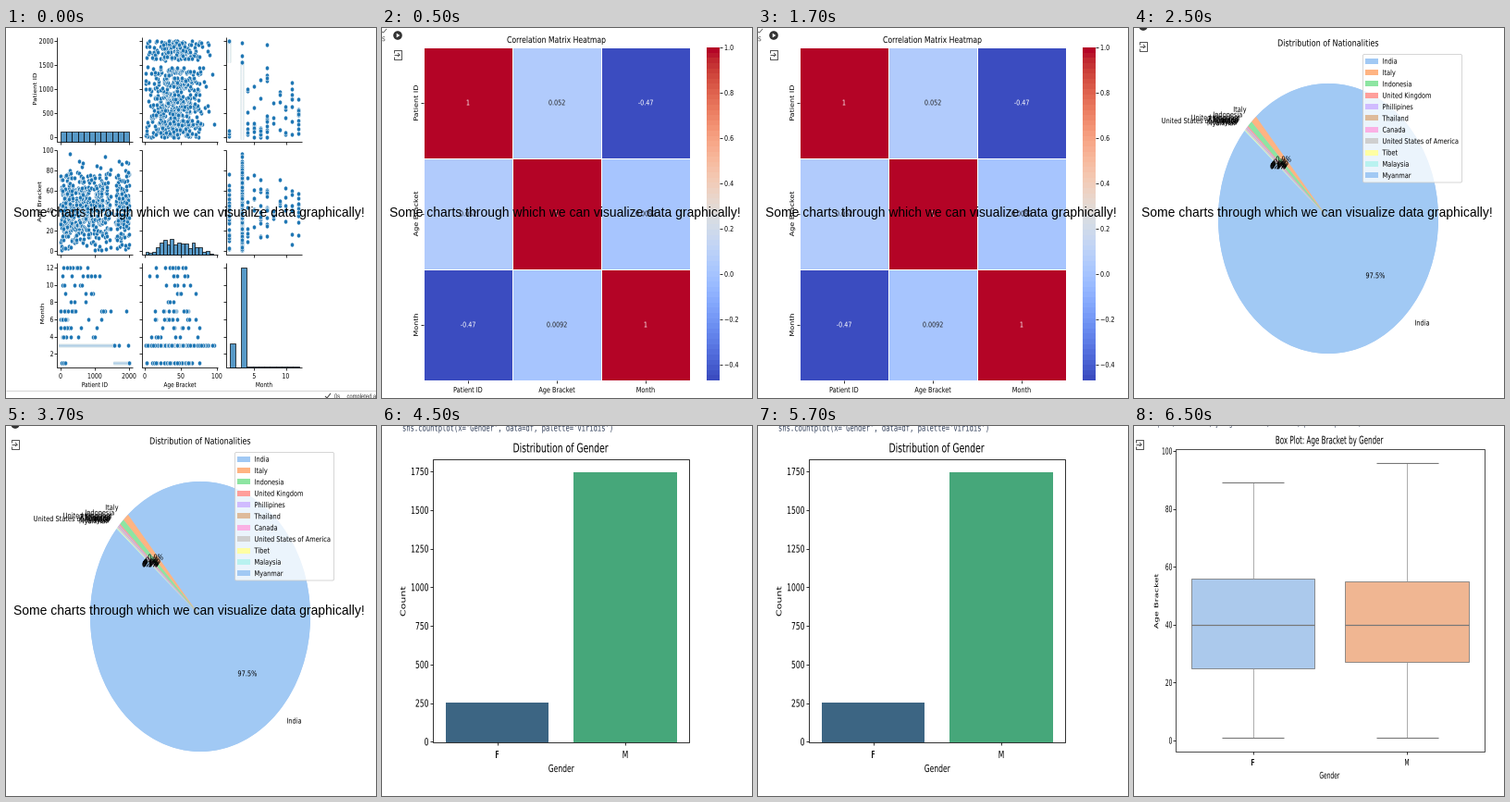
Write a matplotlib script that moves like this. It is 400 px wide and 400 px high and loops after 8000 ms.

```python
import numpy as np
import matplotlib.pyplot as plt
from matplotlib.animation import FuncAnimation
from matplotlib.markers import MarkerStyle
from matplotlib.patches import Circle, Ellipse, FancyBboxPatch, PathPatch, Polygon, Rectangle
from matplotlib.textpath import TextPath
from matplotlib.transforms import Affine2D

SIZE, DPI = 400, 100
PT = 72 / DPI  # points per pixel
CAP = 0.73  # capital height of DejaVu Sans in em
BLUE, BAR_BLUE, INK = "#1f77b4", "#5799c7", "#262626"
PASTEL = ["#a1c9f4", "#ffb482", "#8de5a1", "#ff9f9b", "#d0bbff", "#debb9b",
          "#fab0e4", "#cfcfcf", "#fffea3", "#b9f2f0", "#a1c9f4"]

fig = plt.figure(figsize=(SIZE / DPI, SIZE / DPI), dpi=DPI, facecolor="white")


def new_scene(stretch):
    """Full-figure axes in pixels, y down; stretch is the picture's height ratio."""
    ax = fig.add_axes([0, 0, 1, 1])
    ax.set(xlim=(0, SIZE), ylim=(SIZE, 0), autoscale_on=False)
    ax.axis("off")
    ax.stretch = stretch
    return ax


def text(ax, x, y, s, px, ha="center", rotation=0, color="black",
         family="DejaVu Sans", on_baseline=False, zorder=3):
    """Text with y at the middle of its capitals, or at its baseline."""
    path = TextPath((0, 0), str(s), size=px, prop={"family": family})
    box = path.get_extents()
    anchor = {"left": 0, "center": (box.x0 + box.x1) / 2, "right": box.x1}[ha]
    drop = 0 if on_baseline else CAP * px / 2
    place = (Affine2D().translate(-anchor, -drop).rotate_deg(rotation)
             .scale(1, -ax.stretch).translate(x, y))
    ax.add_patch(PathPatch(place.transform_path(path), fc=color, ec="none",
                           zorder=zorder))


def vtext(ax, x, y, s, px):
    text(ax, x, y, s, px, rotation=90)


def line(ax, xs, ys, color="black", px=0.8, **kw):
    ax.plot(xs, ys, color=color, lw=px * PT, solid_capstyle="butt", **kw)


def box(ax, x0, y0, x1, y1, fill="none", edge="none", px=0.8, **kw):
    ax.add_patch(Rectangle((x0, y0), x1 - x0, y1 - y0, fc=fill, ec=edge,
                           lw=px * PT, **kw))


def y_ticks(ax, x, ys, labels, px, gap=5):
    for y, s in zip(ys, labels):
        line(ax, [x - 3, x], [y, y])
        text(ax, x - gap, y, s, px, ha="right")


def x_ticks(ax, y, xs, labels, px, gap=9):
    for x, s in zip(xs, labels):
        line(ax, [x, x], [y, y + 3])
        text(ax, x, y + gap, s, px)


def caption(ax):
    ax.text(8, 204, "Some charts through which we can visualize data graphically!",
            fontsize=13.9 * PT, family="Liberation Sans", zorder=10)


def output_icon(ax, x, y):
    line(ax, [x - 4, x - 4, x + 4, x + 4, x - 4, x - 4],
         [y - 2, y - 5, y - 5, y + 5, y + 5, y + 2], "#555555", 1)
    line(ax, [x - 4, x + 2], [y, y], "#555555", 1)
    line(ax, [x, x + 2, x], [y - 2, y, y + 2], "#555555", 1)


def code(ax, x, y, s, px):
    text(ax, x, y, s, px, ha="left", color="#33415c", family="DejaVu Sans Mono",
         on_baseline=True)


def patient_data():
    rng = np.random.default_rng(4)

    def ages(n, known=1.0, mean=41, spread=20):
        a = np.abs(rng.normal(mean, spread, n)).clip(1, 96)
        return np.where(rng.random(n) < known, a, np.nan)

    march = np.linspace(0, 1560, 1500)
    march_age = ages(1500, 0.34)
    march_age[(march > 1460) | (abs(march - 1265) < 30)] = np.nan
    january = np.linspace(1600, 2000, 400)
    undated = rng.uniform(1610, 2000, 135)
    groups = [(march, march_age, 3), (january, ages(400, 0.06), 1),
              (undated, ages(135), np.nan),
              (np.array([20, 70, 130]), ages(3), 1),
              (np.array([1700, 1960]), ages(2), 3)]
    for month, n in zip(range(4, 13), [7, 8, 12, 12, 3, 4, 5, 8, 12]):
        groups.append((1320 * rng.random(n) ** 1.4, ages(n, 1, 40, 18), month))
    groups.append((np.array([1450, 1920]), ages(2), 7))
    ids, age = (np.concatenate([g[k] for g in groups]) for k in (0, 1))
    month = np.concatenate([np.full(len(g[0]), g[2]) for g in groups])
    return ids, age, month


def pair_plot():
    ax = new_scene(1.25)
    ids, age, month = patient_data()
    xs = [59 + ids * 0.037, 150 + age * 0.78, 241 + (month - 1) * 6.83]
    ys = [118 - ids * 0.052, 241 - age * 1.09, 361.5 - (month - 1) * 9.32]
    lefts, bottoms = [55, 147, 238], [123, 245, 367]
    dot = MarkerStyle("o", transform=Affine2D().scale(0.82, 1))
    for r, bottom in enumerate(bottoms):
        for c, left in enumerate(lefts):
            line(ax, [left, left, left + 82], [bottom - 113, bottom, bottom])
            if r != c:
                ax.scatter(xs[c], ys[r], s=(5 * PT) ** 2, marker=dot, color=BLUE,
                           edgecolors="white", linewidths=0.5 * PT, zorder=3)

    def bars(x0, width, base, heights):
        for i, h in enumerate(heights):
            box(ax, x0 + i * width, base - h, x0 + (i + 1) * width, base,
                BAR_BLUE, "black", 0.7, zorder=3)

    bars(59, 74 / 12, 123, [11] * 12)
    bars(150.5, 3.85, 245, [3.5, 2.5, 3.5, 8, 13, 16, 11, 17, 11, 13, 12, 12,
                            7, 13, 8, 8, 3, 4, 1])
    bars(241.5, 6.25, 367, [26, 0, 108, 1.2, 0.8, 1.5, 1.2, 0.8, 0.8, 0.8, 1, 1.5])

    y_ticks(ax, 55, 118 - 26 * np.arange(5), range(0, 2001, 500), 6.2, 4)
    y_ticks(ax, 55, 241 - 21.8 * np.arange(6), range(0, 101, 20), 6.2, 4)
    y_ticks(ax, 55, 352.2 - 18.64 * np.arange(6), range(2, 13, 2), 6.2, 4)
    for left in lefts[1:]:
        for top, step, bottom in zip([14, 132, 259], [26, 21.8, 18.64], bottoms):
            for y in np.arange(top, bottom, step):
                line(ax, [left - 3, left], [y, y])
    for places, names in (([59, 96, 133], [0, 1000, 2000]),
                          ([150, 189, 228], [0, 50, 100]),
                          ([268.3, 302.5], [5, 10])):
        x_ticks(ax, 367, places, names, 6.2)
        for bottom in bottoms[:2]:
            for x in places:
                line(ax, [x, x], [bottom, bottom + 3])
    for x, s in ((96, "Patient ID"), (188, "Age Bracket"), (279, "Month")):
        text(ax, x, 385.5, s, 5.8)
    for x, y, s in ((31, 66, "Patient ID"), (36, 188, "Age Bracket"), (39, 309, "Month")):
        vtext(ax, x, y, s, 5.8)

    line(ax, [0, 400], [391.5, 391.5], "#d5d5d5", 1)
    line(ax, [345, 347, 351], [398, 400, 395], "#444444", 1)
    for x, s in ((355, "0s"), (368.5, "completed at")):
        text(ax, x, 400.5, s, 5.8, ha="left", color="#333333",
             family="Liberation Sans", on_baseline=True)
    caption(ax)
    return ax


def heatmap():
    ax = new_scene(1.24)
    names = ["Patient ID", "Age Bracket", "Month"]
    corr = np.array([[1, 0.052, -0.47], [0.052, 1, 0.0092], [-0.47, 0.0092, 1]])
    shade = dict(cmap="coolwarm", vmin=-0.47, vmax=1)
    ax.pcolormesh(45 + 96 * np.arange(4), 21 + 120 * np.arange(4), corr,
                  edgecolors="white", linewidth=0.7 * PT, **shade)
    ramp = np.linspace(1, -0.47, 64)[:, None]
    ax.pcolormesh([351, 365], np.linspace(21, 381, 65), ramp, **shade)
    ax.set(xlim=(0, SIZE), ylim=(SIZE, 0))
    for (r, c), v in np.ndenumerate(corr):
        text(ax, 93 + 96 * c, 80.5 + 120 * r, f"{v:.2g}", 6.4,
             color=INK if 0 < v < 1 else "white")
    x_ticks(ax, 381, [93, 189, 285], names, 6.5, 10)
    for i, name in enumerate(names):
        y = 81 + 120 * i
        line(ax, [42, 45], [y, y])
        vtext(ax, 36.5, y, name, 6.5)
    for v in np.arange(-2, 6) / 5:
        y = 21 + (1 - v) * 360 / 1.47
        line(ax, [365, 368], [y, y])
        text(ax, 370, y, f"{v:.1f}".replace("-", "\u2212"), 6.4, ha="left")
    text(ax, 188.5, 12.5, "Correlation Matrix Heatmap", 7.7)

    ax.add_patch(Circle((17, 8), 4.8, fc="#333333"))
    ax.add_patch(Polygon([(15.7, 5.6), (15.7, 10.4), (19.4, 8)], fc="white"))
    output_icon(ax, 17, 29)
    line(ax, [0, 1.5, 5], [4, 5, 1], "#555555", 0.8)
    text(ax, 0, 11, "s", 7, ha="left", color="#555555")
    caption(ax)
    return ax


def pie_chart():
    ax = new_scene(1.227)
    names = ["India", "Italy", "Indonesia", "United Kingdom", "Phillipines", "Thailand",
             "Canada", "United States of America", "Tibet", "Malaysia", "Myanmar"]
    shares = [97.5, 0.9, 0.7, 0.2] + [0.1] * 7
    cx, cy, radius = 210, 206, 119

    def at(angle, k):
        return (cx + k * radius * np.cos(angle),
                cy - k * radius * ax.stretch * np.sin(angle))

    ax.add_patch(Ellipse((cx, cy), 2 * radius, 2 * radius * ax.stretch, fc=PASTEL[0]))
    start = np.radians(140)
    for name, share, color in zip(names, shares, PASTEL):
        end = start + 2 * np.pi * share / sum(shares)
        arc = [at(a, 1) for a in np.linspace(start, end, 200 if share > 50 else 5)]
        ax.add_patch(Polygon([(cx, cy)] + arc, fc=color))
        mid = (start + end) / 2
        text(ax, *at(mid, 1.1), name, 6.6, ha="left" if np.cos(mid) > 0 else "right")
        text(ax, *at(mid, 0.6), f"{share:.1f}%", 6.6)
        start = end

    ax.add_patch(FancyBboxPatch((249, 30), 104, 135.5, boxstyle="round,pad=1.5",
                                fc=(1, 1, 1, 0.8), ec="#cccccc", lw=0.8 * PT, zorder=4))
    for i, (name, color) in enumerate(zip(names, PASTEL)):
        y = 35.7 + 12.35 * i
        box(ax, 250, y - 3, 263.5, y + 3, color, zorder=5)
        text(ax, 268.5, y, name, 6.6, ha="left", zorder=5)
    text(ax, 210, 16, "Distribution of Nationalities", 8)
    ax.add_patch(Circle((10, -2), 4.8, fc="#333333"))
    output_icon(ax, 10, 20)
    caption(ax)
    return ax


def count_plot():
    ax = new_scene(1.45)
    code(ax, 22, 5.5, "sns.countplot(x='Gender', data=df, palette='viridis')", 7.15)
    box(ax, 69, 298.5, 180, 341.5, "#3c6583")
    box(ax, 207, 50, 318.5, 341.5, "#46a77a")
    box(ax, 54.5, 35.5, 331.5, 341.5, edge="black")
    y_ticks(ax, 55, 341.3 - 41.75 * np.arange(8), range(0, 1751, 250), 7.6)
    x_ticks(ax, 341.5, [124.5, 263], "FM", 7.6, 13.5)
    text(ax, 194, 370, "Gender", 7.6)
    vtext(ax, 22.5, 189.5, "Count", 7.6)
    text(ax, 193.5, 23.5, "Distribution of Gender", 9.27)
    return ax


def box_plot():
    ax = new_scene(1.65)
    code(ax, 0, -0.3, "sns.boxplot(x='Gender', y='Age Bracket', data=df, palette='pastel')", 6.1)
    output_icon(ax, 6, 20)
    grey = "#777777"

    def y_of(v):
        return 340 - 3.13 * v

    for x, color, low, q1, median, q3, high in (
            (128.5, "#abc9ec", 1, 25, 40, 56, 89), (295, "#f0b692", 1, 27, 40, 55, 96)):
        for end, quartile in ((low, q1), (high, q3)):
            line(ax, [x, x], [y_of(end), y_of(quartile)], "#999999")
            line(ax, [x - 33.5, x + 33.5], [y_of(end)] * 2, grey, 1.1)
        box(ax, x - 66.7, y_of(q3), x + 66.7, y_of(q1), color, grey)
        line(ax, [x - 66.7, x + 66.7], [y_of(median)] * 2, grey, 1.2)
    box(ax, 45, 25, 378.5, 352, edge="#222222")
    values = range(0, 101, 20)
    y_ticks(ax, 45, [y_of(v) for v in values], values, 5.95, 4)
    x_ticks(ax, 352, [128.5, 295], "FM", 5.95, 11.5)
    text(ax, 211.5, 377.5, "Gender", 5.95)
    vtext(ax, 24, 189.5, "Age Bracket", 5.95)
    text(ax, 211.5, 15, "Box Plot: Age Bracket by Gender", 7.14)
    return ax


scenes = [pair_plot(), heatmap(), pie_chart(), count_plot(), box_plot()]
STEP = 500
SCHEDULE = [0] + [1] * 4 + [2] * 4 + [3] * 4 + [4] * 3


def update(frame):
    for i, scene in enumerate(scenes):
        scene.set_visible(i == SCHEDULE[frame])
    return scenes


animation = FuncAnimation(fig, update, frames=len(SCHEDULE), interval=STEP,
                          repeat=True, repeat_delay=0, blit=False)
plt.show()
```
